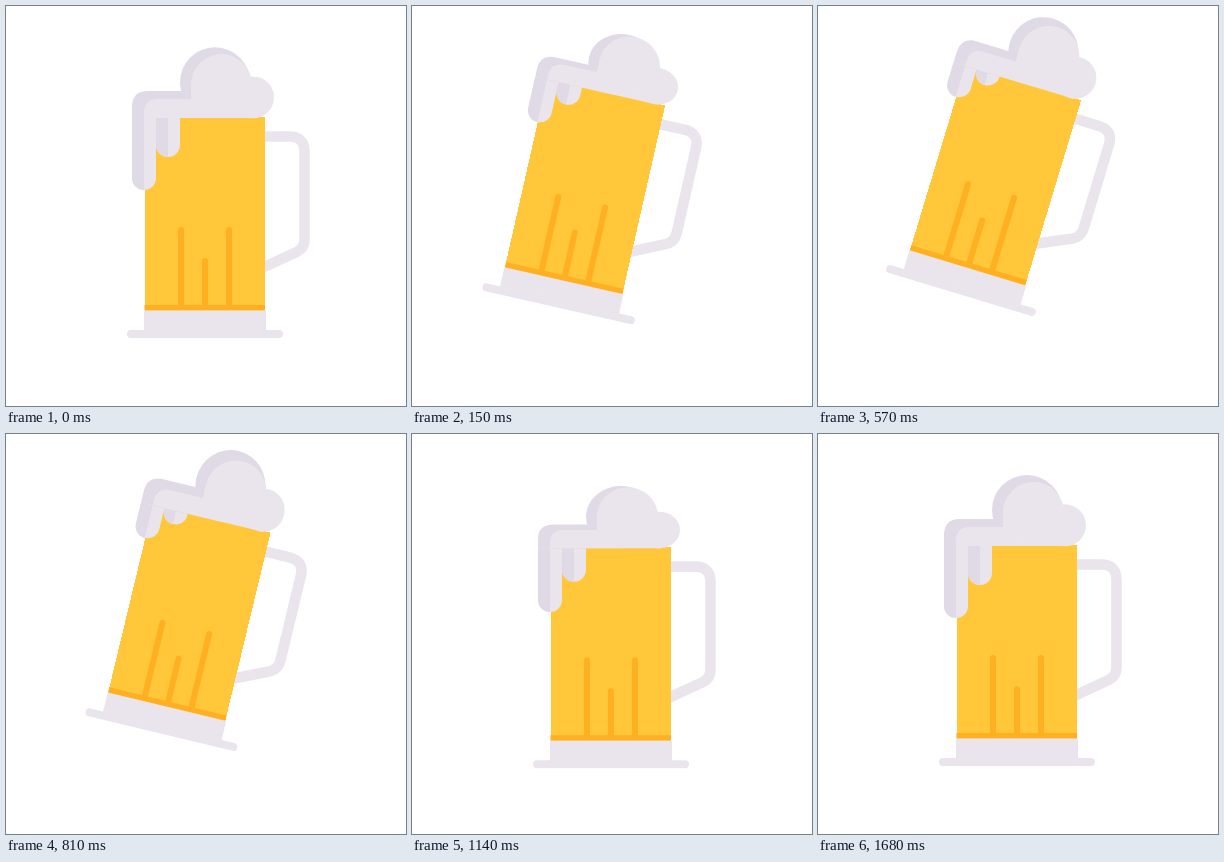
These frames come from a looping animation (400x400 px, 3.74 s). An HTML page:

```html
<!DOCTYPE html>
<html lang="en">
<head>
<meta charset="utf-8">
<title>Beer mug</title>
<style>
  html, body { margin: 0; width: 100%; height: 100%; overflow: hidden; background: #fff; }
  svg { display: block; width: 100%; height: 100%; }
  .light { fill: #eae5ed; }
  .dark { fill: #e0d9e6; }
  .line { fill: none; stroke: #ffb022; stroke-width: 6; stroke-linecap: round; }
</style>
</head>
<body>
<svg viewBox="0 0 400 400">
  <g id="mug">
    <path fill="none" stroke="#eae5ed" stroke-width="10.6"
      d="M255 130.500H283Q298.500 130.500 298.500 146V233Q298.500 242 291 245.800L255 262.500"/>
    <rect x="138.500" y="111" width="120.500" height="194" fill="#ffc739" shape-rendering="crispEdges"/>
    <path class="line" d="M175 224V300M199 255V300M223 224V300"/>
    <rect x="138.500" y="299" width="120.500" height="5.500" fill="#ffb022"/>
    <rect class="light" x="138" y="304.500" width="122" height="22"/>
    <rect class="light" x="121" y="324" width="156" height="8" rx="4"/>

    <path class="light" id="drip1"/>
    <path class="dark" id="drip1Shade"/>
    <path class="light" id="drip2"/>
    <path class="dark" id="drip2Shade"/>

    <g id="foamBack">
      <path class="dark" d="M126 112V101Q126 85 142 85H209V112Z"/>
      <circle class="dark" cx="209" cy="76" r="35"/>
      <circle class="light" cx="247" cy="91.300" r="21"/>
    </g>
    <g class="light" id="foamFront">
      <path d="M138 112V107Q138 93 152 93H185V78H247V112Z"/>
      <circle cx="215.500" cy="78.500" r="30.500"/>
    </g>
  </g>
</svg>
<script>
const LOOP = 3740, STEP = 30;
const FOAM_LINE = 112;

const el = id => document.getElementById(id);
const mix = (a, b, u) => a + (b - a) * u;

// Sine ease from 0 to 1; power below 1 starts sooner, above 1 later.
function ramp(t, from, to, power = 1) {
  const u = Math.min(1, Math.max(0, (t - from) / (to - from)));
  return (1 - Math.cos(Math.PI * u ** power)) / 2;
}

const bump = (t, center, width) => Math.exp(-(((t - center) / width) ** 2));

// Quick dip that dies away after landing.
function recoil(t) {
  const w = Math.max(0, (t - 970) / 50);
  return w * Math.exp(1 - w);
}

function pose(t) {
  const tilt = ramp(t, 0, 360, .45) - ramp(t, 570, 1030, 1.9);
  const slide = ramp(t, 0, 220, .47) - ramp(t, 570, 1020, 1.85);
  const rise = ramp(t, 0, 360, .53) - ramp(t, 570, 995, 1.9);
  const retract = ramp(t, 0, 360, .51) - ramp(t, 740, 1310);
  const squash = bump(t, 150, 80) + bump(t, 1125, 90);
  return {
    angle: 16.8 * tilt,
    x: -56 * slide,
    y: -43.5 * rise + 7 * recoil(t),
    back: 1 - .13 * squash + .18 * bump(t, 940, 95),
    front: 1 - .05 * squash,
    drip1: mix(72, 32, retract),
    drip2: mix(39, 12.5, retract)
  };
}

function setDrip(id, x, length) {
  const r = 12, bend = FOAM_LINE + length - r;
  const top = `M${x} ${FOAM_LINE}V${bend}a${r} ${r} 0 0 0 `;
  el(id).setAttribute('d', `${top}${2 * r} 0V${FOAM_LINE}Z`);
  el(id + 'Shade').setAttribute('d', `${top}${r} ${r}V${FOAM_LINE}Z`);
}

function setFoam(id, scale) {
  el(id).setAttribute('transform',
    `translate(0 ${FOAM_LINE * (1 - scale)}) scale(1 ${scale})`);
}

function draw(time) {
  const p = pose(Math.floor((time % LOOP) / STEP) * STEP);
  el('mug').setAttribute('transform',
    `translate(${p.x} ${p.y}) rotate(${p.angle} 199 328)`);
  setFoam('foamBack', p.back);
  setFoam('foamFront', p.front);
  setDrip('drip1', 126, p.drip1);
  setDrip('drip2', 150, p.drip2);
}

const start = performance.now();
function tick() {
  draw(performance.now() - start);
  requestAnimationFrame(tick);
}
tick();
</script>
</body>
</html>
```
